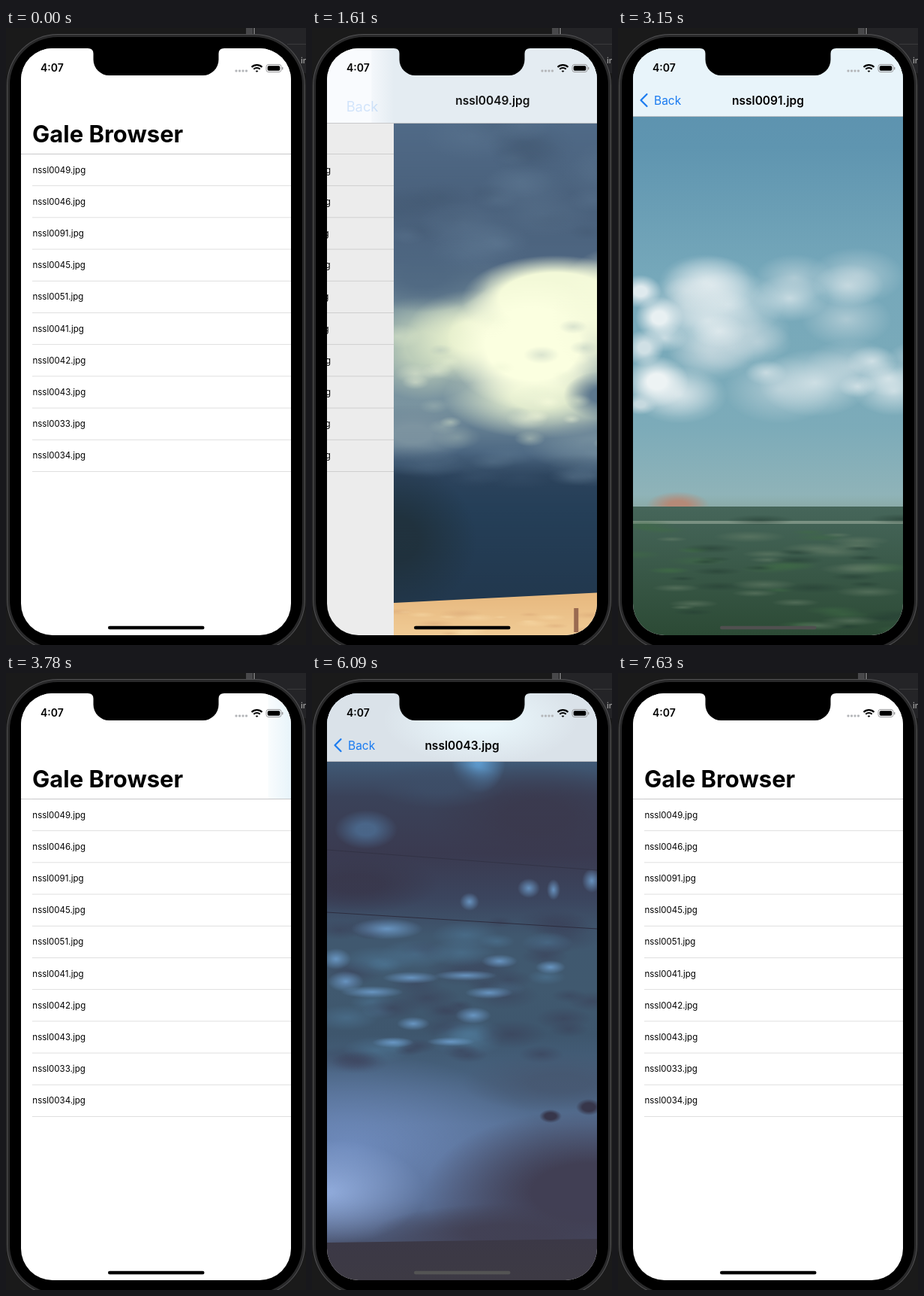
Recreate the animation shown at these times as an HTML page with a canvas. Size 400x820 px, loop 7700 ms.

```html
<!DOCTYPE html>
<html lang="en">
<head>
<meta charset="utf-8">
<title>Photo list</title>
<style>
html, body { margin: 0; width: 100%; height: 100%; overflow: hidden; background: #1a1a1a; }
canvas { display: block; width: 400px; height: 820px; }
</style>
</head>
<body>
<canvas id="stage"></canvas>
<script>
const LOOP = 7700, STEP = 70;
const L = 20, T = 27, W = 360, H = 780, R = L + W, B = T + H;
const ROW = 42.2, LIST_TOP = 167, BAR_LOW = 117;
const FONT = 'Inter, "Open Sans", sans-serif';
const BLUE = '#1a7bf0';
const TITLE = 'Gale Browser';
const files = ['0049', '0046', '0091', '0045', '0051', '0041', '0042', '0043', '0033', '0034']
  .map(n => `nssl${n}.jpg`);

const canvas = document.getElementById('stage');
const dpr = window.devicePixelRatio || 1;
canvas.width = 400 * dpr;
canvas.height = 820 * dpr;
const ctx = canvas.getContext('2d');

const clamp = v => Math.min(1, Math.max(0, v));
const mix = (a, b, k) => a + (b - a) * k;
const smooth = v => { v = clamp(v); return v * v * (3 - 2 * v); };

// Critically damped spring, settled after 600 ms.
const damp = s => 1 - (1 + 9 * s) * Math.exp(-9 * s);
const spring = ms => damp(0.6 * clamp(ms / 600)) / damp(0.6);

function random(seed) {
  return () => {
    seed = (seed * 16807) % 2147483647;
    return seed / 2147483647;
  };
}

/* ---- pictures ---- */

function soft(g, x, y, rx, ry, color, alpha = 1, core = 0.3) {
  g.save();
  g.globalAlpha *= alpha;
  g.translate(x, y);
  g.scale(rx, ry);
  const fill = g.createRadialGradient(0, 0, 0, 0, 0, 1);
  fill.addColorStop(0, color);
  fill.addColorStop(core, color);
  fill.addColorStop(1, color + '00');
  g.fillStyle = fill;
  g.fillRect(-1, -1, 2, 2);
  g.restore();
}

function scatter(g, seed, count, [x0, y0, x1, y1], size, flat, colors, alpha) {
  const rnd = random(seed);
  for (let i = 0; i < count; i++) {
    const r = size * (0.5 + rnd());
    soft(g, mix(x0, x1, rnd()), mix(y0, y1, rnd()), r, r * flat,
      colors[i % colors.length], alpha, 0);
  }
}

function sky(g, stops) {
  const fill = g.createLinearGradient(0, T, 0, B);
  for (const [y, c] of stops) fill.addColorStop((y - T) / H, c);
  g.fillStyle = fill;
  g.fillRect(L, T, W, H);
}

function land(g, left, right, top, bottom) {
  const fill = g.createLinearGradient(0, Math.min(left, right), 0, B);
  fill.addColorStop(0, top);
  fill.addColorStop(1, bottom);
  g.fillStyle = fill;
  g.beginPath();
  g.moveTo(L, left);
  g.lineTo(R, right);
  g.lineTo(R, B);
  g.lineTo(L, B);
  g.fill();
}

function line(g, x0, y0, x1, y1, color, width) {
  g.strokeStyle = color;
  g.lineWidth = width;
  g.beginPath();
  g.moveTo(x0, y0);
  g.lineTo(x1, y1);
  g.stroke();
}

function picture(paint) {
  const c = document.createElement('canvas');
  c.width = W;
  c.height = H;
  const g = c.getContext('2d');
  g.translate(-L, -T);
  paint(g);
  return c;
}

const beach = picture(g => {
  sky(g, [[27, '#5c768f'], [126, '#506a87'], [230, '#4a617c'], [310, '#4e6681'],
    [380, '#758f9c'], [500, '#7a94a0'], [565, '#4c6782'], [595, '#2c435c'],
    [640, '#253f58'], [757, '#22384e']]);
  scatter(g, 11, 40, [20, 110, 380, 310], 45, 0.5, ['#5f7993', '#425871'], 0.4);
  soft(g, 60, 425, 85, 70, '#bccdb9');
  soft(g, 120, 410, 85, 62, '#e6efcd');
  soft(g, 215, 490, 130, 56, '#dfe9cc');
  soft(g, 235, 360, 125, 58, '#f3f9d8', 1, 0.6);
  soft(g, 205, 420, 115, 88, '#fbffe0', 1, 0.55);
  soft(g, 320, 380, 90, 90, '#f6fbdc');
  soft(g, 298, 488, 52, 32, '#5d788e');
  soft(g, 300, 555, 110, 36, '#7f98a5', 0.7);
  soft(g, 60, 330, 90, 48, '#4e6781', 0.8);
  soft(g, 45, 540, 80, 38, '#8399a4', 0.8);
  scatter(g, 5, 40, [20, 380, 380, 560], 24, 0.5, ['#f8fcdd', '#a9bcb6', '#e9f2d3'], 0.4);
  scatter(g, 7, 20, [20, 560, 380, 600], 40, 0.35, ['#3c556f', '#5f7a91'], 0.4);
  soft(g, 20, 680, 110, 100, '#1f2f38', 0.8);
  land(g, 764, 746, '#e6b67c', '#f0cb95');
  scatter(g, 3, 24, [20, 775, 380, 805], 20, 0.2, ['#f8dba8', '#d9a777'], 0.5);
  g.fillStyle = '#9a6a50';
  g.fillRect(260, 771, 6, 32);
});

const field = picture(g => {
  sky(g, [[27, '#5b90ae'], [160, '#5f95b0'], [330, '#76a8ba'], [530, '#7cabb9'],
    [620, '#8fb3b8'], [640, '#8aa9a5']]);
  scatter(g, 21, 30, [60, 320, 400, 500], 50, 0.6, ['#e9f0f2', '#c3d6dd'], 0.7);
  soft(g, 30, 350, 28, 22, '#dfeaee');
  soft(g, 55, 385, 32, 28, '#e8f0f2');
  soft(g, 35, 425, 26, 24, '#d0e0e5');
  soft(g, 52, 470, 42, 34, '#edf3f4');
  soft(g, 30, 500, 22, 14, '#c6d9df');
  soft(g, 80, 634, 42, 18, '#b58a78');
  land(g, 636, 636, '#46665a', '#2c4a35');
  g.fillStyle = '#7a9182';
  g.fillRect(L, 655, W, 4);
  scatter(g, 9, 60, [20, 650, 380, 800], 34, 0.16, ['#68806a', '#243d33', '#3f6b45'], 0.55);
});

const storm = picture(g => {
  sky(g, [[27, '#5d88a8'], [117, '#405a76'], [165, '#3a4259'], [240, '#3a3a50'],
    [300, '#3b455e'], [350, '#40586f'], [420, '#40596f'], [480, '#3e566d'],
    [530, '#46607c'], [600, '#566f93'], [700, '#53668a'], [757, '#4a5470']]);
  soft(g, 300, 190, 140, 70, '#3a384c', 0.8);
  soft(g, 60, 280, 110, 40, '#38364a', 0.8);
  soft(g, 222, 118, 36, 42, '#609fd4', 0.9, 0.1);
  soft(g, 72, 208, 42, 26, '#4d6f95', 0.8);
  soft(g, 170, 150, 90, 30, '#3d4e68', 0.8);
  scatter(g, 31, 55, [20, 330, 380, 525], 34, 0.4, ['#3a435b', '#4d7695', '#3a4058'], 0.6);
  const wisps = [[210, 304, 13, 12], [289, 286, 15, 13], [322, 288, 9, 14], [373, 276, 13, 16],
    [32, 380, 20, 14], [100, 340, 48, 14], [45, 410, 24, 14], [80, 424, 42, 8],
    [132, 405, 38, 8], [205, 402, 42, 7], [250, 383, 24, 9], [236, 425, 32, 8],
    [215, 455, 24, 11], [135, 466, 22, 9], [108, 491, 28, 7], [185, 490, 32, 6], [318, 391, 20, 9]];
  for (const [x, y, rx, ry] of wisps) soft(g, x, y, rx, ry, '#6fa0d0', 0.8, 0.05);
  soft(g, 50, 630, 260, 125, '#7390c4', 0.8, 0.05);
  soft(g, 20, 690, 130, 70, '#9ab5e6', 0.8, 0.05);
  soft(g, 330, 545, 130, 40, '#45546c', 0.7);
  soft(g, 370, 690, 220, 110, '#413f54', 1, 0.35);
  soft(g, 260, 745, 180, 40, '#413f52', 0.9);
  soft(g, 318, 589, 15, 9, '#37364a', 1, 0.5);
  soft(g, 369, 577, 17, 11, '#37364a', 1, 0.5);
  line(g, L, 235, R, 262, '#2d2d3f99', 1);
  line(g, L, 318, R, 340, '#2d2d3f', 1.2);
  land(g, 757, 752, '#3b3846', '#3d3a44');
});

const visits = [
  { row: 0, tap: 630, push: 630, pop: 1506, pic: beach, tint: '#e4ecf2', home: 0 },
  { row: 2, tap: 2380, push: 2380, pop: 3186, pic: field, tint: '#e8f4fa', home: 80 },
  { row: 7, tap: 3990, push: 4060, pop: 6686, pic: storm, tint: '#dae2e9', home: 84 }
];

/* ---- interface ---- */

function text(str, x, y, size, weight, color, alpha = 1, align = 'left') {
  if (alpha <= 0) return;
  ctx.save();
  ctx.globalAlpha = clamp(alpha);
  ctx.font = `${weight} ${size}px ${FONT}`;
  ctx.textAlign = align;
  ctx.fillStyle = color;
  ctx.fillText(str, x, y);
  ctx.restore();
}

function box(x, y, w, h, r, color) {
  ctx.fillStyle = color;
  ctx.beginPath();
  ctx.roundRect(x, y, w, h, r);
  ctx.fill();
}

function drawDesk() {
  ctx.fillStyle = '#1a1a1a';
  ctx.fillRect(0, 0, 400, 820);
  ctx.fillStyle = '#242427';
  ctx.fillRect(333, 0, 67, 60);
  ctx.fillStyle = '#48484a';
  ctx.fillRect(320, 0, 9, 8);
  ctx.fillStyle = '#6b6b6d';
  ctx.fillRect(330, 0, 2, 8);
  ctx.fillStyle = '#3a3a3c';
  ctx.fillRect(375, 21, 25, 1);
  text('in', 393, 47, 11, 500, '#a5a5a5');
  box(1, 8, 398, 820, 68, '#525254');
  box(2, 9, 396, 818, 67, '#29292a');
  box(5, 12, 390, 812, 64, '#000');
}

function drawList(shift, selected, dim) {
  ctx.fillStyle = '#fff';
  ctx.fillRect(L, T, W, H);
  if (selected >= 0) {
    ctx.fillStyle = '#cfd2d6';
    ctx.fillRect(L, LIST_TOP + selected * ROW, W, ROW);
  }
  ctx.fillStyle = '#dcdcdc';
  for (let i = 0; i <= files.length; i++) {
    ctx.fillRect(35 + shift, LIST_TOP + i * ROW, W + 100, 0.9);
  }
  files.forEach((name, i) => {
    text(name, 35.5 + shift, LIST_TOP + 25.6 + i * ROW, 11.5, 400, '#000');
  });
  ctx.fillStyle = `rgba(0,0,0,${0.1 * dim})`;
  ctx.fillRect(L, T, W, H);
}

function drawBar(visit, d, q) {
  const bottom = mix(LIST_TOP, BAR_LOW, q);
  const edge = L + W * (1 - d);
  ctx.save();
  ctx.beginPath();
  ctx.rect(L, T, W, bottom - T);
  ctx.clip();
  ctx.fillStyle = '#fff';
  ctx.fillRect(L, T, W, H);
  if (d > 0) {
    ctx.fillStyle = `rgba(200,220,240,${0.16 * d})`;
    ctx.fillRect(L, T, W, H);
    const fade = ctx.createLinearGradient(edge - 30, 0, edge, 0);
    fade.addColorStop(0, visit.tint + '40');
    fade.addColorStop(1, visit.tint);
    ctx.fillStyle = fade;
    ctx.fillRect(edge - 30, T, W + 30, H);
    if (visit.pic === storm) soft(ctx, edge + 205, 62, 130, 60, '#e9f6fb', 1, 0.2);
  }
  ctx.restore();
  ctx.fillStyle = '#c6c6c8';
  ctx.fillRect(L, bottom, W, 0.9);

  // The large title shrinks into the back label.
  const size = mix(31, 15.5, q), x = mix(35, 48, q), y = mix(152, 102, q);
  text(TITLE, x, y, size, 700, '#000', 1 - q * 1.35);
  if (d <= 0) return;
  text('Back', x, y, size, 400, BLUE, (q - 0.78) / 0.22);
  text(files[visit.row], 200 + 243 * Math.pow(1 - d, 1.28), 102, 15.5, 600, '#000',
    Math.sin(d * Math.PI / 2), 'center');
  const arrow = clamp((q - 0.85) / 0.15);
  if (arrow > 0) {
    ctx.save();
    ctx.globalAlpha = arrow;
    ctx.strokeStyle = BLUE;
    ctx.lineWidth = 2.2;
    ctx.lineCap = ctx.lineJoin = 'round';
    ctx.beginPath();
    ctx.moveTo(38.5, 88);
    ctx.lineTo(30.5, 96);
    ctx.lineTo(38.5, 104);
    ctx.stroke();
    ctx.restore();
  }
}

function drawStatus() {
  text('4:07', 46, 58, 14, 600, '#000');
  for (let i = 0; i < 4; i++) box(305.5 + i * 4.5, 55.5, 3, 3, 1, '#b4b6b9');

  ctx.save();
  ctx.beginPath();
  ctx.moveTo(334.5, 59);
  ctx.arc(334.5, 59, 13, -Math.PI * 0.75, -Math.PI * 0.25);
  ctx.closePath();
  ctx.clip();
  ctx.strokeStyle = '#000';
  ctx.lineWidth = 2.2;
  for (const r of [1.5, 6, 9.9]) {
    ctx.beginPath();
    ctx.arc(334.5, 59, r, Math.PI, 0);
    ctx.stroke();
  }
  ctx.restore();

  ctx.strokeStyle = '#9a9a9c';
  ctx.lineWidth = 1;
  ctx.beginPath();
  ctx.roundRect(347, 48.5, 20, 10, 3);
  ctx.stroke();
  box(348.7, 50.2, 16.6, 6.6, 1.7, '#000');
  box(368, 51.8, 1.4, 3.6, 0.7, '#9a9a9c');
}

function drawNotch() {
  ctx.fillStyle = '#000';
  ctx.beginPath();
  ctx.moveTo(109, 26);
  ctx.lineTo(109, 27);
  ctx.quadraticCurveTo(116.5, 27, 116.5, 34);
  ctx.lineTo(116.5, 42);
  ctx.arcTo(116.5, 63, 138, 63, 21);
  ctx.lineTo(262, 63);
  ctx.arcTo(283.5, 63, 283.5, 42, 21);
  ctx.lineTo(283.5, 34);
  ctx.quadraticCurveTo(283.5, 27, 291, 27);
  ctx.lineTo(291, 26);
  ctx.fill();
}

function draw(t) {
  const visit = visits.filter(v => t >= v.tap).pop() || visits[0];
  const d = t < visit.pop ? spring(t - visit.push) : 1 - spring(t - visit.pop);
  const q = mix(d, smooth(d), 0.7);
  const hidden = smooth((t - 4830) / 280) - smooth((t - 5770) / 320);
  const selected = t >= visit.tap && t < visit.pop ? visit.row : -1;

  ctx.setTransform(dpr, 0, 0, dpr, 0, 0);
  drawDesk();

  ctx.save();
  ctx.beginPath();
  ctx.roundRect(L, T, W, H, 42);
  ctx.clip();
  drawList(-0.3 * W * d, selected, d);
  if (d > 0) ctx.drawImage(visit.pic, L + W * (1 - d), T);
  ctx.save();
  ctx.translate(0, -(BAR_LOW + 1 - T) * hidden);
  drawBar(visit, d, q);
  ctx.restore();
  drawStatus();
  const shade = Math.round(visit.home * smooth((d - 0.4) / 0.6));
  box(136, 794.7, 128.5, 4.6, 2.3, `rgb(${shade},${shade},${shade})`);
  ctx.restore();

  drawNotch();
}

function tick(now) {
  draw(Math.floor((now % LOOP) / STEP) * STEP);
  requestAnimationFrame(tick);
}
requestAnimationFrame(tick);
</script>
</body>
</html>
```
